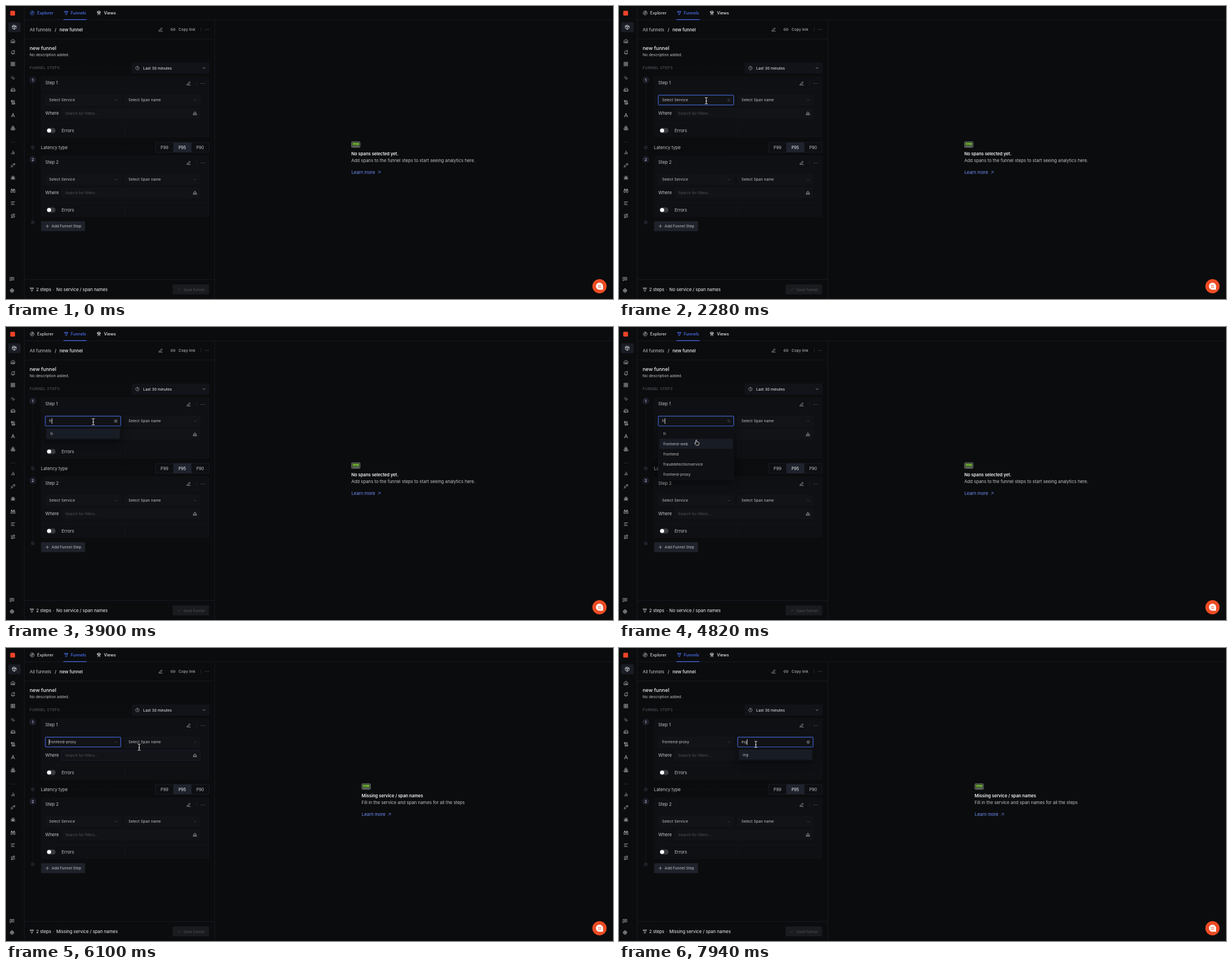
Recreate the animation shown at these times as an HTML page. Size 1078x520 px, loop 8 s.

```html
<!DOCTYPE html>
<html lang="en">
<head>
<meta charset="utf-8">
<title>Funnel builder</title>
<style>
html, body { margin: 0; width: 100%; height: 100%; overflow: hidden; background: #0b0c0e; }
svg { display: block; width: 1078px; height: 520px; font-family: Inter, sans-serif; }
text { white-space: pre; }
.panel { filter: drop-shadow(0 3px 7px rgba(0, 0, 0, .55)); }
</style>
</head>
<body>
<svg id="stage" viewBox="0 0 1078 520"></svg>
<script>
const stage = document.getElementById('stage');
const LOOP = 8000;
const BLUE = '#4e74f8', GREY = '#c0c1c3', WHITE = '#f2f2f3', DIM = '#50535a', LINE = '#1b1e27';

function el(tag, attrs = {}, parent = stage) {
  const node = document.createElementNS('http://www.w3.org/2000/svg', tag);
  for (const k in attrs) node.setAttribute(k, attrs[k]);
  parent.appendChild(node);
  return node;
}
const group = (parent = stage) => el('g', {}, parent);
const rect = (x, y, width, height, fill, stroke = 'none', rx = 1, parent = stage) =>
  el('rect', { x, y, width, height, fill, stroke, rx, 'stroke-width': .6 }, parent);
const line = (x1, y1, x2, y2, stroke = LINE, dash = 'none') =>
  el('line', { x1, y1, x2, y2, stroke, 'stroke-width': .8, 'stroke-dasharray': dash });

// y is the middle of the capitals
function label(x, y, str, size = 6.75, fill = GREY, weight = 400, spacing = 0, parent = stage) {
  const node = el('text', { x, y: y + size * .36, fill, 'font-size': size, 'font-weight': weight, 'letter-spacing': spacing }, parent);
  node.textContent = str;
  return node;
}
const body = (x, y, str, fill = GREY, weight = 400, parent = stage) =>
  label(x, y, str, 7.875, fill, weight, -.04, parent);

const ICONS = {
  box: 'M12 2l9 5v10l-9 5-9-5V7zM3 7l9 5 9-5M12 12v10M7.5 4.5l9 5',
  home: 'M3 10l9-7 9 7v11H3zM9 21v-8h6v8',
  bell: 'M10 21h4M14 3a6 6 0 0 0-8 5c0 7-3 9-3 9h18s-2-1-3-5M18 2a3 3 0 1 0 .01 0',
  grid: 'M3 3h7v7H3zM14 3h7v7h-7zM14 14h7v7h-7zM3 14h7v7H3z',
  spark: 'M9 9l4.5 11 1.6-4.9 4.9-1.6zM7 2l.8 3M5 8l-3-.8M14 4l-2 2M6 12l-2 2',
  drive: 'M22 12H2M5.5 5L2 12v7h20v-7l-3.5-7zM6 16h.01M10 16h.01',
  scroll: 'M15 12h-4M15 8h-4M19 17V5a2 2 0 0 0-2-2H4M8 21h12a2 2 0 0 0 2-2v-2H11v2a2 2 0 1 1-4 0V5a2 2 0 1 0-4 0v3h4',
  compasses: 'M12 3a2 2 0 1 0 .01 0M11 7L4 21M13 7l7 14M5 13c4 4 10 4 14 0',
  cubes: 'M12 2l5 3v5l-5 3-5-3V5zM7 12l5 3v5l-5 3-5-3v-5zM17 12l5 3v5l-5 3-5-3v-5zM7 17v5M17 17v5M12 8v5',
  dots: 'M4 12h.01M12 12h.01M20 12h.01',
  bars: 'M6 20v-6M12 20V4M18 20V10',
  plug: 'M19 5l3-3M2 22l3-3M6 18a3 3 0 0 0 4 0l2-2-6-6-2 2a3 3 0 0 0 0 4zM12 6l6 6 2-2a4 4 0 0 0-6-6z',
  bug: 'M8 10a4 4 0 0 1 8 0v5a4 4 0 0 1-8 0zM12 11v8M8 2l2 4M16 2l-2 4M3 8l5 3M21 8l-5 3M2 14h6M16 14h6M3 21l5-4M21 21l-5-4',
  glasses: 'M10 10h4M4 7h5v13H2v-6zM20 7h-5v13h7v-6zM5 3h3v4H5zM16 3h3v4h-3z',
  list: 'M3 5h18M3 12h12M3 19h16',
  route: 'M6 16a3 3 0 1 0 .01 0M18 2a3 3 0 1 0 .01 0M9 19h8.5a3.5 3.5 0 0 0 0-7h-11a3.5 3.5 0 0 1 0-7H15',
  note: 'M3 4h18v13H8l-5 4zM8 9h8M8 13h5',
  gear: 'M12 3a9 9 0 1 0 .01 0M12 9a3 3 0 1 0 .01 0M12 3v6M12 15v6M4 8l5 3M15 13l5 3M20 8l-5 3M9 13l-5 3',
  compass: 'M12 2a10 10 0 1 0 .01 0M16 8l-2 6-6 2 2-6z',
  cone: 'M3 4h18l-6 10v6l-6 1v-7zM5 8h14',
  tower: 'M5 4h14l-1 6H6zM3 10h18M9 10L7 22M15 10l2 12M8 16h8M12 2v2',
  pencil: 'M11 21h10M4 16L16 3l4 4L8 20l-5 1z',
  link: 'M9 17H7A5 5 0 0 1 7 7h2M15 7h2a5 5 0 0 1 0 10h-2M8 12h8',
  clock: 'M12 2a10 10 0 1 0 .01 0M12 6v6l4 2',
  down: 'M6 9l6 6 6-6',
  tray: 'M4 14a8 8 0 0 1 16 0zM2 19h20M12 6V3',
  plus: 'M4 12h16M12 4v16',
  check: 'M4 12l5 5L20 6',
  upright: 'M5 19L19 5M8 5h11v11',
  search: 'M11 4a7 7 0 1 0 .01 0M16 16l5 5'
};
const icon = (name, cx, cy, stroke = GREY, size = 8.5, parent = stage) => el('path', {
  d: ICONS[name], stroke, fill: 'none', 'stroke-width': 2.1, 'stroke-linecap': 'round', 'stroke-linejoin': 'round',
  transform: `translate(${cx - size / 2} ${cy - size / 2}) scale(${size / 24})`
}, parent);

// Sidebar
line(32.5, 0, 32.5, 520);
rect(7.5, 8.5, 8.6, 8.6, '#ee4328', 'none', 1.6);
rect(4, 29, 22, 17.5, '#1a1d25', 'none', 2);
icon('box', 14.6, 37.6, WHITE, 9);
Object.entries({ home: 62, bell: 82.5, grid: 103, spark: 128, drive: 149, scroll: 171, compasses: 194, cubes: 216.5,
  dots: 241.5, bars: 260, plug: 283, bug: 305, glasses: 328, list: 350, route: 372.5 })
  .forEach(([name, y]) => icon(name, 12.4, y, name === 'spark' || name === 'dots' ? '#7c7f86' : GREY));
icon('note', 10.7, 484.5);
icon('gear', 10.7, 505);

// Tabs
line(33, 24.5, 1078, 24.5);
const explorerIcon = icon('compass', 46.5, 12.3);
const explorerText = label(55.3, 12.3, 'Explorer', 7.3, GREY, 500);
icon('cone', 107, 12.3, BLUE);
label(115, 12.3, 'Funnels', 7.3, BLUE, 500);
rect(102, 23.6, 41, 1.2, BLUE, 'none', 0);
icon('tower', 165, 12.3, WHITE);
label(174, 12.3, 'Views', 7.3, WHITE, 500);

// Left panel
line(370.5, 25, 370.5, 520);
line(33, 58.5, 370, 58.5);
line(33, 485.5, 370, 485.5);
body(42, 41.7, 'All funnels');
body(86.5, 41.7, '/', WHITE);
body(95, 41.7, 'new funnel', WHITE, 500);
icon('pencil', 274.8, 41.7, GREY, 8);
icon('link', 296.5, 41.7, GREY, 9);
label(306.5, 41.7, 'Copy link');
line(346.5, 38, 346.5, 45, '#2a2e38');
icon('dots', 357, 41.7);
label(42, 75.2, 'new funnel', 9, WHITE, 500, -.05);
label(42, 86.5, 'No description added.', 6.75, GREY, 400, -.03);
label(42, 109.7, 'FUNNEL STEPS', 6.75, DIM, 500, .27);
line(99, 110, 222, 110, '#191c23', '1 1.6');
rect(224, 101, 136.8, 18.3, '#111319', '#181b24');
icon('clock', 233.4, 110.2, GREY, 7.5);
label(243.7, 110.2, 'Last 30 minutes', 6.75, WHITE);
icon('down', 351.8, 110.2, GREY, 8);

line(47.5, 138, 47.5, 384, '#1d2029', '1.5 1.5');
for (const y of [251, 384]) el('circle', { cx: 47.5, cy: y, r: 3.4, fill: '#1d2029' });

body(62, 251, 'Latency type');
line(112, 251, 265, 251, '#191c23', '1 1.6');
['P99', 'P95', 'P90'].forEach((name, i) => {
  rect(265.5 + i * 31.8, 242, 31.8, 17.7, i === 1 ? '#1f232d' : '#0e0f12', '#20242e', 0);
  label(274.5 + i * 31.7, 251, name, 7.3, i === 1 ? WHITE : GREY);
});

function stepCard(n, dy) {
  el('circle', { cx: 47.5, cy: 131.2 + dy, r: 6, fill: '#1c1f29' });
  label(n === 1 ? 46.1 : 45.4, 131.2 + dy, n, 6.75, '#c5c8e0', 500);
  rect(62.3, 125.3 + dy, 298.4, 107.7, '#0f1013', '#15171c', 2);
  line(62.5, 147.5 + dy, 360.5, 147.5 + dy, '#111317');
  line(62.5, 208.5 + dy, 360.5, 208.5 + dy, '#14161a');
  line(211.5, 208.5 + dy, 211.5, 233 + dy, '#14161a');
  body(69.7, 136.2 + dy, 'Step ' + n);
  icon('pencil', 324.6, 137.3 + dy, GREY, 8);
  line(338.5, 133.5 + dy, 338.5, 140.5 + dy, '#22262f');
  icon('dots', 349.5, 137.5 + dy);
  const box = (x, y, w, h) => rect(x, y + dy, w, h, '#121317', '#15181e');
  const selects = [[69.8, 'Select Service'], [210.8, 'Select Span name']].map(([x, hint]) => {
    const frame = box(x, 158.2, 134, 17.5);
    return { x, hint, frame, text: label(x + 6.6, 167 + dy, hint), arrow: icon('down', x + 125.2, 167.2 + dy, DIM, 7.5) };
  });
  body(69.7, 190.6 + dy, 'Where');
  const where = box(98.6, 182, 246.2, 17.3);
  label(105, 190.5 + dy, 'Search for filters...', 6.75, DIM);
  icon('tray', 335.5, 190.7 + dy, GREY, 8);
  rect(72, 216.5 + dy, 16, 9, '#393b40', 'none', 4.5);
  el('circle', { cx: 76.6, cy: 221 + dy, r: 3.6, fill: '#fff' });
  body(98.7, 221.2 + dy, 'Errors');
  return { selects, where };
}
const step1 = stepCard(1, 0);
stepCard(2, 141);

rect(62.3, 382, 78, 17.5, '#1f222a', 'none', 1);
icon('plus', 73.4, 390.8, GREY, 7.5);
label(81, 390.8, 'Add Funnel Step');

icon('cone', 46, 503, GREY);
body(53.5, 503.2, '2 steps', WHITE);
body(83.5, 503.2, '·', GREY);
const status = body(89.3, 503.2, '', WHITE);
rect(296, 494.2, 64.6, 17.6, '#191b1f');
icon('check', 307.5, 503.2, '#484a4f', 8);
label(315, 503.2, 'Save funnel', 6.75, '#484a4f', 500);

// Empty state
const empty = group();
rect(613.5, 240.8, 15.4, 10.2, '#3d4440', '#8d9790', 1.6, empty);
rect(615.2, 242.6, 12, 4.6, '#6fae35', '#24341a', .5, empty);
label(616.3, 245, '▪▪▪▪', 3, '#23400f', 400, 0, empty);
rect(615.6, 248.5, 11.2, 1.1, '#798279', 'none', .4, empty);
const emptyTitle = body(613.2, 262.2, '', WHITE, 600, empty);
emptyTitle.setAttribute('font-size', 7.7);
const emptyText = body(613.2, 274.6, '', GREY, 400, empty);
body(613.4, 295.3, 'Learn more', '#7190f9', 400, empty);
icon('upright', 662.5, 295.5, '#7190f9', 7, empty);

// Chat button
el('circle', { cx: 1054, cy: 497.4, r: 12.6, fill: '#ee4c24' });
el('path', { d: 'M1054 491a6.3 6.3 0 1 0 0 12.6h6.3v-6.3a6.3 6.3 0 0 0-6.3-6.3z', fill: '#fff' });
el('path', { d: 'M1051 496h6M1051 499h6', stroke: '#ee4c24', 'stroke-width': 1.1 });

// Controls of the active select
const searchIcon = icon('search', 195, 167, '#6b6e75', 6);
const clearIcon = group();
el('circle', { cx: 195, cy: 167, r: 2.7, fill: '#62656c' }, clearIcon);
el('path', { d: 'M194 166l2 2M196 166l-2 2', stroke: '#121317', 'stroke-width': .6 }, clearIcon);
const caret = rect(76.6, 162, .8, 10, '#fff', 'none', 0);

const menu = group();
const panel = rect(69.5, 178, 134.5, 148, '#0f1013', '#14161b', 1.5, menu);
panel.setAttribute('class', 'panel');
const mark = rect(72, 180.3, 130, 18, '#181c25', 'none', 1, menu);
const thumb = rect(197.6, 180.3, 4.6, 16, '#1d212d', 'none', 0, menu);
const rows = Array.from({ length: 8 }, (_, i) => label(78.8, 189.3 + i * 18, '', 6.75, GREY, 400, 0, menu));

const pointer = group();
const black = { fill: '#0c0c0c', stroke: '#fff', 'stroke-width': .8, 'stroke-linejoin': 'round' };
const cursors = {
  arrow: el('path', { ...black, d: 'M.3.4V9.4L2.4 7.5 4 10.9 5.6 10.2 4.1 6.9H7z' }, pointer),
  hand: el('path', { ...black, d: 'M-.9.8Q0-.6.8.8V3.6l3.3.8q1 .3.9 1.4L4.2 9.6H-.6L-3.2 6q.2-1.2 1.3-.6l1 .8z' }, pointer),
  beam: el('path', { d: 'M-2.4-5.4Q0-5.6 0-4.4Q0-5.6 2.4-5.4M0-4.4V4.6M-2.4 5.6Q0 5.8 0 4.6Q0 5.8 2.4 5.6M-1.2.8H1.2', fill: 'none', stroke: '#f4f4f4', 'stroke-width': 1 }, pointer)
};

// Motion: start, end, then start, control and end points
const PATH = [
  [460, 1140, 66, 14, 230, 412, 519.5, 190],
  [1500, 1940, 519.5, 190, 330, 212, 155, 168],
  [4600, 5060, 155, 168, 135, 200, 120, 241],
  [5500, 5520, 120, 241, 121, 250, 122, 257.5],
  [5840, 6100, 122, 257.5, 190, 205, 236.5, 176],
  [6100, 6320, 236.5, 176, 240, 172, 243, 171]
];
const clamp = v => Math.max(0, Math.min(1, v));
const ramp = (t, from, to) => clamp((t - from) / (to - from));
const smooth = u => u * u * (3 - 2 * u);

function cursorAt(t) {
  const [from, to, ax, ay, bx, by, cx, cy] = PATH.filter(s => t >= s[0]).pop() || PATH[0];
  const u = smooth(ramp(t, from, to));
  const mix = (a, b, c) => a * (1 - u) ** 2 + 2 * b * u * (1 - u) + c * u * u;
  return [mix(ax, bx, cx), mix(ay, by, cy)];
}

const SERVICES = ['currencyservice', 'emailservice', 'flagd', 'frauddetectionservice', 'frontend-proxy',
  'consumer-svc-1', 'consumer-svc-3', 'consumer-svc-4', 'frontend', 'frontend-web'];
const FOUND = ['frontend-web', 'frontend', 'frauddetectionservice', 'frontend-proxy'];
const SPANS = ['GET', 'POST', 'HTTP GET', 'HTTP POST', 'tcp.connect', 'tls.connect', 'dns.lookup', 'resourceFetch'];
const CARET_ON = [[2300, 2880], [3180, 4000], [4600, 5060], [5640, 6320], [6400, 6900], [7480, LOOP]];

const typedAt = t => t >= 7940 ? 'ing' : t >= 7860 ? 'in' : t >= 7760 ? 'i' : t >= 5640 ? '' : t >= 3400 ? 'fr' : t >= 3180 ? 'f' : '';
const isOpen = t => (t >= 2280 && t < 5640) || t >= 6360;

function options(t, typed) {
  const all = t < 6000 ? SERVICES : SPANS;
  if (!typed) return all.slice(0, 8);
  if (t >= 4420 && t < 6000) return [typed, ...FOUND];
  if (t >= 3900 && t < 4420) return [typed];
  return [typed, ...all.filter(s => s.includes(typed))];
}

// Border fade: share of recent moments with the cursor inside
function hover(t, x, y, w, h) {
  let n = 0;
  for (let k = 0; k < 10; k++) {
    const at = t - k * 16, [px, py] = cursorAt(at);
    if (at > 460 && !isOpen(at) && px > x && px < x + w && py > y && py < y + h) n++;
  }
  return n / 10;
}
const blend = (a, b, u) => `rgb(${a.map((v, i) => Math.round(v + (b[i] - v) * u))})`;
const border = u => blend([21, 24, 30], [78, 116, 248], u);
const show = (node, on) => node.setAttribute('visibility', on ? 'visible' : 'hidden');
const put = (node, str) => { if (node.textContent !== str) node.textContent = str; };

function drawMenu(t, typed, dx, cy) {
  const p = t < 6000
    ? smooth(ramp(t, 2270, 2480)) * (1 - ramp(t, 5640, 5760))
    : smooth(ramp(t, 6350, 6520));
  show(menu, p > 0);
  const scale = .8 + .2 * p;
  menu.setAttribute('opacity', p);
  menu.setAttribute('transform', `translate(${dx} ${178 * (1 - scale)}) scale(1 ${scale})`);
  const shown = options(t, t >= 5640 && t < 6000 ? 'fr' : typed);
  rows.forEach((row, i) => put(row, shown[i] || ''));
  panel.setAttribute('height', shown.length * 18 + 4);
  const scrolls = p > 0 && t < 3180;
  const active = cy > 180 && t < 5760 && t > 4600 ? Math.min(shown.length - 1, Math.floor((cy - 180) / 18)) : 0;
  mark.setAttribute('y', 180.3 + active * 18);
  mark.setAttribute('width', scrolls ? 125.5 : 130);
  show(thumb, scrolls);
}

function draw(t) {
  const typed = typedAt(t), open = isOpen(t), [cx, cy] = cursorAt(t);
  const focus = t >= 6360 ? 1 : t >= 2280 ? 0 : -1;
  const chosen = t >= 5640, filled = t >= 5700;

  const tab = blend([78, 116, 248], [208, 209, 211], ramp(t, 460, 620));
  explorerIcon.setAttribute('stroke', tab);
  explorerText.setAttribute('fill', tab);

  step1.selects.forEach((s, i) => {
    const on = focus === i;
    put(s.text, on && open && typed ? typed : i === 0 && chosen ? 'frontend-proxy' : s.hint);
    const u = on ? 1 : hover(t, s.x, 158, 134, 17.6);
    s.frame.setAttribute('stroke', border(u));
    s.frame.setAttribute('stroke-width', on ? 1 : .8);
    show(s.arrow, !(on && open));
  });
  step1.where.setAttribute('stroke', border(hover(t, 98.6, 182, 246, 17.3) * .6));

  const dx = focus === 1 ? 141 : 0;
  const overBox = cy < 177;
  show(searchIcon, open && !(typed && overBox));
  show(clearIcon, open && typed && overBox);
  clearIcon.setAttribute('transform', `translate(${dx})`);
  searchIcon.setAttribute('transform', `translate(${192 + dx} 164) scale(.25)`);

  show(caret, CARET_ON.some(([a, b]) => t >= a && t < b));
  const width = open && typed ? step1.selects[focus].text.getComputedTextLength() : 0;
  caret.setAttribute('x', 76.3 + dx + width);

  drawMenu(t, typed, dx, cy);

  put(status, filled ? 'Missing service / span names' : 'No service / span names');
  put(emptyTitle, filled ? 'Missing service / span names' : 'No spans selected yet.');
  put(emptyText, filled ? 'Fill in the service and span names for all the steps' : 'Add spans to the funnel steps to start seeing analytics here.');
  empty.setAttribute('transform', `translate(${filled ? 18.4 : 0})`);

  const inBox = cy > 158 && ((cx > 98 && cx < 345 && cy < 199.5) || (cx > 70 && cx < 204 && cy < 177));
  const kind = cy < 24 || (open && cy > 178) ? 'hand' : inBox ? 'beam' : 'arrow';
  for (const k in cursors) show(cursors[k], t >= 460 && k === kind);
  pointer.setAttribute('transform', `translate(${cx} ${cy})`);
}

const start = performance.now();
function tick() {
  draw((performance.now() - start) % LOOP);
  requestAnimationFrame(tick);
}
tick();
</script>
</body>
</html>
```
